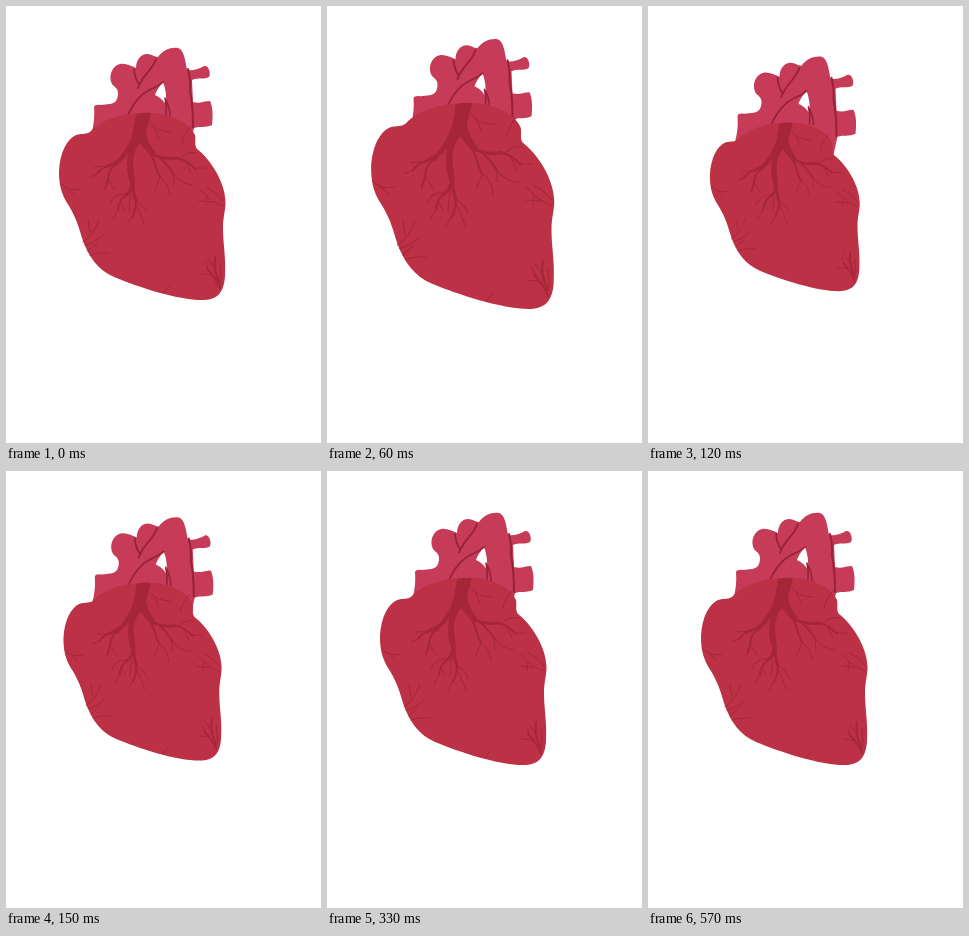
Animation of 315x437 px, one loop 600 ms. Source, as an HTML page:

```html
<!DOCTYPE html>
<html lang="en">
<head>
<meta charset="utf-8">
<title>Beating heart</title>
<style>
  html, body { margin: 0; width: 100%; height: 100%; overflow: hidden; background: #fff; }
  svg { display: block; width: 100%; height: 100%; }
  .line { fill: none; stroke-linecap: round; stroke-linejoin: round; }
</style>
</head>
<body>
<svg viewBox="0 0 315 437">
  <g id="vessels">
    <path fill="#c53b58" fill-rule="evenodd" d="M84 132 C87 123 89 113 88 101 Q89 98 95 99 L104 98 C110 97 112 93 112 87
      C112 82 108 81 106 78 C102 70 106 60 114 58 C120 57 125 60 130 62 C130 54 135 48 141 48
      C146 48 148 51 152 51 C157 44 165 41 172 42 C178 44 179 53 181 64
      C187 65 193 63 198 60 C203 59 205 68 203 71 C199 74 191 71 186 74
      L187 96 C194 98 198 95 204 95 C207 101 207 111 206 119 C199 122 194 120 188 122 L184 140 H100 Z
      M157 76 Q151 83 149 89 Q156 92 160 99 Q161 86 157 76 Z"/>
    <g class="line" stroke="#98213a">
      <path stroke-width="1.8" d="M150 53 C147 64 136 69 132 82 M128 63 Q129 73 133 78"/>
      <path stroke-width="1.7" d="M157 76 C150 83 143 82 136 89 Q128 96 122 109"/>
      <path stroke-width="1.6" d="M159 92 Q161 101 160 109 M160 94 Q164 102 164 110"/>
      <path stroke-width="2" d="M182 63 Q185 75 184 85 Q187 98 187 121"/>
    </g>
  </g>
  <g id="muscle">
    <path fill="#bc3145" d="M85 125 C95 114 116 107 138 107 C160 106 182 114 189 129 C190 135 188 139 191 143
      C204 153 219 175 219.5 196 C219.5 205 217 211 217 222 C217 238 220 250 219 270
      C218 286 212 293 199 294 C174 295 132 281 108 271 C92 264 83 251 77 235
      C72 219 71 214 63 200 C54 187 53 176 53 165 C54 146 61 133 70 129 C76 127 81 129 85 125 Z"/>
    <g class="line" stroke="#a62639">
      <path fill="#a62639" stroke="none" d="M130 108 Q138 106 145 107 L140 126 Q141 136 150 147 L147 152 Q139 144 134 137
        Q126 146 127 160 L129 177 L125 180 Q119 164 122 147 L111 160 L108 158 Q124 139 127 126 Z"/>
      <path stroke-width="3" d="M118 151 Q109 157 102 160 M126 176 Q126 184 120 189 M127 177 Q127 187 130 195 M148 149 Q159 154 171 152"/>
      <path stroke-width="2" d="M102 160 Q95 162 91 168 M110 158 Q102 164 102 174 L99 183 M120 189 Q113 193 112 204
        M130 195 Q130 203 126 211 M144 147 C150 156 150 166 154 171 M154 152 Q163 160 168 169 M171 152 Q181 154 189 163
        M214 282 Q209 271 201 263 M214 277 Q207 265 209 251"/>
      <path stroke-width="1" d="M91 168 L84 171 M102 160 L89 161 M102 173 L109 184 M120 188 Q108 187 104 198
        M112 203 L107 213 M114 196 L118 204 M126 210 L121 219 M130 198 L139 219 M125 184 L123 205 M130 195 Q137 197 141 207
        M154 171 L149 184 M154 171 Q163 177 164 190 M168 169 Q175 178 187 179 M167 167 L168 179 M175 152 Q181 145 191 147
        M189 162 L199 162 M180 156 L185 167 M144 117 Q151 126 165 126 M148 121 L153 132
        M218 200 Q207 198 194 183 M217 195 Q209 185 201 182 M207 196 L193 195 M201 190 L200 199
        M206 269 L195 268 M203 265 L199 256 M209 263 L202 253 M215 274 L214 258
        M77 236 Q88 229 93 213 M84 226 L82 214 M79 239 Q89 237 97 229 M84 249 Q93 246 103 247 M82 245 L91 237
        M55 178 Q63 186 74 183 M61 182 L69 190 M185 120 Q177 129 176 138 M158 287 L163 280"/>
    </g>
  </g>
</svg>
<script>
  const LOOP = 600;
  const SLOT = 30;
  const PIVOT = { x: 142, y: 205 };
  // Time in ms and swelling: each beat swells, contracts and returns to rest
  const KEYS = [
    [0, 0], [60, 1], [120, -1],
    [180, 0], [240, 1], [300, -1], [330, 0],
    [360, 0], [420, 1], [480, -1], [540, 0],
    [LOOP, 0]
  ];
  const vessels = document.getElementById("vessels");
  const muscle = document.getElementById("muscle");

  function swellAt(time) {
    const next = KEYS.findIndex(([keyTime]) => keyTime > time);
    const [t0, from] = KEYS[next - 1];
    const [t1, to] = KEYS[next];
    return from + (to - from) * (time - t0) / (t1 - t0);
  }

  function draw(time) {
    const swell = swellAt(Math.floor((time % LOOP) / SLOT) * SLOT);
    const { x, y } = PIVOT;
    vessels.setAttribute("transform", `translate(${-1.5 * swell} ${-8.8 * swell})`);
    muscle.setAttribute("transform",
      `translate(${x} ${y}) scale(${1 + 0.1 * swell}) translate(${-x} ${-y})`);
  }

  let start;
  function tick(now) {
    start ??= now;
    draw(now - start);
    requestAnimationFrame(tick);
  }
  draw(0);
  requestAnimationFrame(tick);
</script>
</body>
</html>
```
